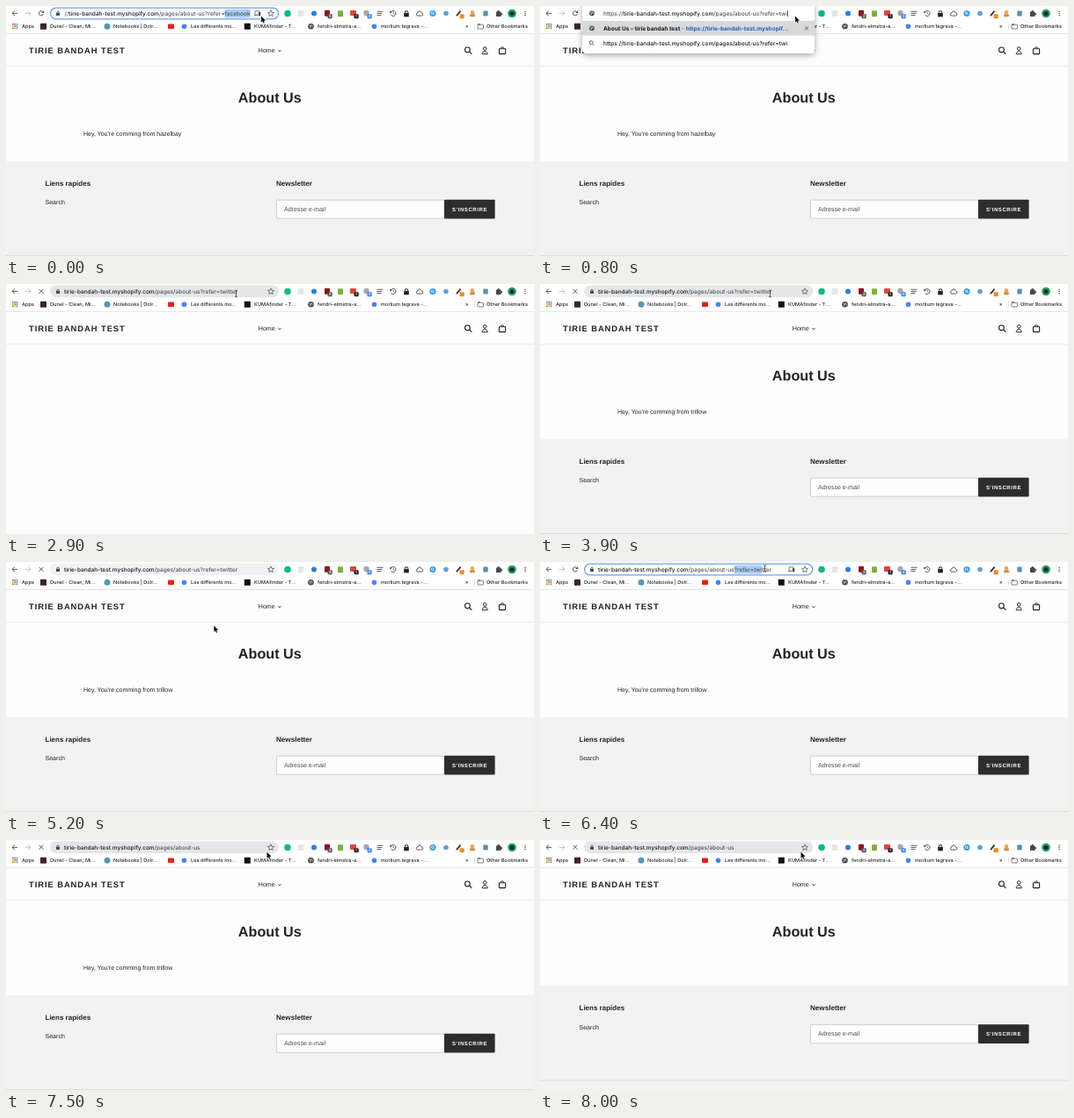
An HTML page with a canvas for the animation above (8200 ms loop, 600 by 285 pixels).

```html
<!DOCTYPE html>
<html lang="fr">
<head>
<meta charset="utf-8">
<title>About Us</title>
<style>
html, body { margin: 0; width: 100%; height: 100%; overflow: hidden; background: #fff; }
canvas { display: block; width: 600px; height: 285px; }
</style>
</head>
<body>
<canvas id="stage"></canvas>
<script>
const W = 600, H = 285, LOOP = 8200, STEP = 100;
const canvas = document.getElementById('stage');
const c = canvas.getContext('2d');
const dpr = window.devicePixelRatio || 1;
canvas.width = W * dpr;
canvas.height = H * dpr;
c.textRendering = 'geometricPrecision';

const UI = 'Inter, Roboto, sans-serif';
const PAGE = '"Liberation Sans", Arial, sans-serif';
const DARK = '#17181a', GREY = '#505357', ICON = '#45484c', INK = '#222', HEAD = '#222';
const HOST = 'tirie-bandah-test.myshopify.com';
const PATH = '/pages/about-us';
const URL_SIZE = 6.5, URL_WEIGHT = 500;

function text(str, x, y, size, color, family = UI, weight = 400, spacing = 0) {
  c.font = `${weight} ${size}px ${family}`;
  c.letterSpacing = spacing + 'px';
  c.fillStyle = color;
  c.fillText(str, x, y);
  const w = c.measureText(str).width;
  c.letterSpacing = '0px';
  return x + w;
}

function rect(x, y, w, h, color) {
  c.fillStyle = color;
  c.fillRect(x, y, w, h);
}

function pill(x, y, w, h, r, fill, stroke, lw = 1) {
  c.beginPath();
  c.roundRect(x, y, w, h, r);
  if (fill) { c.fillStyle = fill; c.fill(); }
  if (stroke) { c.strokeStyle = stroke; c.lineWidth = lw; c.stroke(); }
}

function dot(x, y, r, color) {
  c.beginPath();
  c.arc(x, y, r, 0, 7);
  c.fillStyle = color;
  c.fill();
}

function ring(x, y, r, color, lw = 0.9, from = 0, to = Math.PI * 2) {
  c.beginPath();
  c.arc(x, y, r, from, to);
  c.strokeStyle = color;
  c.lineWidth = lw;
  c.stroke();
}

function line(points, color, lw = 1) {
  c.beginPath();
  points.forEach(([x, y]) => c.lineTo(x, y));
  c.strokeStyle = color;
  c.lineWidth = lw;
  c.stroke();
}

function poly(points, fill) {
  c.beginPath();
  points.forEach(([x, y]) => c.lineTo(x, y));
  c.closePath();
  c.fillStyle = fill;
  c.fill();
}

function magnifier(x, y, r, color, lw) {
  ring(x - r * 0.3, y - r * 0.3, r, color, lw);
  line([[x + r * 0.45, y + r * 0.45], [x + r * 1.4, y + r * 1.4]], color, lw);
}

function globe(x, y, r = 2.9) {
  dot(x, y, r, ICON);
  line([[x - 1.9, y - 1], [x - 0.2, y - 0.2], [x - 0.7, y + 1.7]], '#fff', 0.8);
  line([[x + 0.4, y - 1.9], [x + 0.9, y - 0.5], [x + 2, y + 0.4]], '#fff', 0.8);
}

function padlock(x, y, color, s = 1) {
  rect(x - 2 * s, y - 0.6 * s, 4 * s, 3.2 * s, color);
  ring(x, y - 0.8 * s, 1.3 * s, color, 0.8 * s, Math.PI, 0);
}

function star(x, y, r) {
  const pts = [];
  for (let i = 0; i <= 10; i++) {
    const a = -Math.PI / 2 + i * Math.PI / 5, q = i % 2 ? r * 0.45 : r;
    pts.push([x + q * Math.cos(a), y + q * Math.sin(a)]);
  }
  line(pts, ICON, 0.7);
}

function cloud(x, y) {
  c.beginPath();
  c.arc(x - 2, y + 1, 1.6, Math.PI / 2, Math.PI * 1.5);
  c.arc(x, y - 0.6, 2, Math.PI, Math.PI * 1.9);
  c.arc(x + 2.2, y + 1, 1.6, -Math.PI / 2, Math.PI / 2);
  c.closePath();
  c.strokeStyle = ICON;
  c.lineWidth = 0.9;
  c.stroke();
}

function arrow(x, y, dir, color) {
  line([[x - 3 * dir, y], [x + 3 * dir, y]], color, 0.9);
  line([[x, y - 2.9], [x + 3 * dir, y], [x, y + 2.9]], color, 0.9);
}

function reloadIcon(loading) {
  const x = 40, y = 8.3;
  if (loading) {
    line([[x - 2.5, y - 2.5], [x + 2.5, y + 2.5]], ICON, 0.9);
    line([[x - 2.5, y + 2.5], [x + 2.5, y - 2.5]], ICON, 0.9);
  } else {
    ring(x, y, 2.6, ICON, 0.9, 0.3, 5.4);
    poly([[x + 3.1, y - 3.2], [x + 3.1, y - 0.3], [x + 0.3, y - 0.3]], ICON);
  }
}

function badge(x, label, color) {
  pill(x + 0.5, 9.3, 5.2, 5, 1, color);
  text(label, x + 2, 13.3, 4, '#fff', UI, 600);
}

function extensions() {
  const y = 8.5;
  dot(320, y, 3.8, '#12b886');
  pill(331.6, y - 3.4, 6.8, 6.8, 1, '#e4e6e8');
  dot(350, y, 3, '#2f7de1');
  pill(362, y - 3.7, 6, 7, 1, '#8c1620');
  badge(365, '2', '#555');
  pill(377, y - 3.3, 6, 7, 1, '#7fae42');
  pill(391, y - 3.5, 7, 6, 1, '#e0443e');
  badge(395, '1', '#222');
  dot(409.5, y - 0.5, 3.2, '#a5a9ad');
  badge(410, '6', '#3b82e8');
  for (let i = 0; i < 3; i++) rect(421.5, y - 2.7 + i * 2.2, 7 - i, 0.9, ICON);
  ring(440, y, 3, ICON, 0.9, -2.6, 2.6);
  line([[440, y - 1.6], [440, y], [441.4, y + 0.8]], ICON, 0.8);
  poly([[435.8, y - 2.2], [438.8, y - 2.4], [437, y + 0.2]], ICON);
  padlock(455, y + 0.2, '#222', 1.4);
  cloud(470, y);
  dot(485, y, 3.6, '#3c9be8');
  magnifier(485, y, 1.3, '#fff', 0.7);
  dot(500, y, 2.8, '#5f9fd8');
  line([[512, y + 2.6], [516.5, y - 2.8]], '#333', 1.8);
  badge(515, '·', '#f08a24');
  dot(530, y - 1.3, 2.3, '#e9a45b');
  pill(527, y + 0.8, 6, 2.9, 1.2, '#d58a3c');
  pill(542.3, y - 3, 5.4, 6, 1, '#5a8fb4');
  rect(557, y - 2, 5.5, 5.5, ICON);
  dot(559.7, y - 2.3, 1.3, ICON);
  dot(562.7, y + 0.7, 1.3, ICON);
  dot(575, y, 4.8, '#20a060');
  dot(575, y, 2.6, '#1d2b26');
  for (let i = -1; i < 2; i++) dot(590, y + i * 2.3, 0.75, ICON);
}

function bookmarks() {
  const y = 23.2, base = 25.2, size = 5.65;
  const tints = ['#e2574c', '#4a86e8', '#3fa35b', '#eeb62f'];
  for (let i = 0; i < 9; i++) {
    rect(7 + (i % 3) * 2.3, y - 3.3 + Math.floor(i / 3) * 2.3, 1.7, 1.7, tints[i % 4]);
  }
  pill(39, y - 3.5, 7, 7, 0.5, '#3a2725');
  dot(115, y, 3.5, '#5599ab');
  pill(184, y - 2.7, 7, 5.4, 1, '#e62117');
  dot(202.5, y, 2.8, '#4285f4');
  pill(270.8, y - 3.5, 7, 7, 0.5, '#111');
  globe(346.5, y, 3.3);
  dot(418.5, y, 2.8, '#4285f4');
  [[18, 'Apps'], [50, 'Dunel - Clean, Mi...'], [122, 'Notebooks | Dolr...'],
   [210, 'Les différents mo...'], [282, 'KUMAfinder - T...'],
   [354, 'fendri-elmstra-a...'], [426, 'morlium tegrava -...'],
   [522, '»'], [546, 'Other Bookmarks']].forEach(([x, s]) => text(s, x, base, size, '#26282b', UI, 450));
  rect(532, y - 3.5, 0.6, 7, '#d0d3d6');
  pill(536, y - 2, 6.4, 4.8, 0.6, null, ICON, 0.7);
  rect(536, y - 2.8, 2.8, 1, ICON);
}

function address(x, y, scheme, tail) {
  const a = text(scheme, x, y, URL_SIZE, GREY, UI, URL_WEIGHT);
  const b = text(HOST, a, y, URL_SIZE, DARK, UI, URL_WEIGHT);
  return text(PATH + tail, b, y, URL_SIZE, GREY, UI, URL_WEIGHT);
}

function urlWidth(str) {
  c.font = `${URL_WEIGHT} ${URL_SIZE}px ${UI}`;
  return c.measureText(str).width;
}

function suggestions(rows, tail) {
  c.save();
  c.shadowColor = 'rgba(0,0,0,.35)';
  c.shadowBlur = 7 * dpr;
  c.shadowOffsetY = 2 * dpr;
  pill(48, -4, 264, 24 + 17 * rows, 4, '#fff');
  c.restore();
  rect(48, 17, 264, 16.6, '#d8d9db');
  for (let i = 0; i < rows; i++) {
    const y = 25.3 + 17 * i, base = y + 2.2;
    if (i === 1) {
      magnifier(58.8, y, 2, ICON, 0.8);
      text('https://' + HOST + PATH + tail, 72, base, URL_SIZE, DARK, UI, URL_WEIGHT);
      continue;
    }
    globe(59, y);
    const weight = i ? URL_WEIGHT : 700;
    const end = text('About Us – tirie bandah test', 72, base, URL_SIZE, DARK, UI, weight);
    const dash = text(' - ', end, base, URL_SIZE, GREY, UI, URL_WEIGHT);
    text('https://' + HOST.slice(0, 24) + 'if...', dash, base, URL_SIZE, '#1f5fc0', UI, weight);
  }
  line([[301, 23.3], [305, 27.3]], ICON, 0.8);
  line([[301, 27.3], [305, 23.3]], ICON, 0.8);
}

function omnibox(s, hover) {
  const base = 10.6;
  if (s.edit) {
    if (s.rows) suggestions(s.rows, s.tail);
    globe(59, 8.3);
    const end = address(72, base, 'https://', s.tail);
    rect(end + 0.2, 4.8, 0.6, 7.6, '#222');
    return;
  }
  if (s.focus) pill(50.6, 2.1, 259, 12.8, 6.4, '#fff', '#6f9fe8', 1.3);
  else pill(50, 1.6, 260, 13.6, 6.8, hover ? '#e4e6e8' : '#f0f2f3');
  padlock(59, 8.3, ICON);
  const x = s.scheme ? 66.5 : 66;
  if (s.sel) {
    const lead = s.scheme + HOST + PATH + s.tail;
    const from = x + urlWidth(lead.slice(0, lead.length - s.tail.length + s.sel[0]));
    const full = urlWidth(s.tail.slice(s.sel[0]));
    rect(from, 3.8, full * s.sel[1], 9.6, '#a9cdf6');
  }
  address(x, base, s.scheme, s.tail);
  if (s.focus) {
    pill(283, 5.8, 5.2, 4.2, 0.5, null, ICON, 0.7);
    rect(281.8, 10.4, 4, 0.7, ICON);
    rect(287, 7, 2.2, 4.2, ICON);
  }
  star(301, 8.6, 3.7);
}

function header() {
  rect(0, 31, W, 0.8, '#e2e3e4');
  text('TIRIE BANDAH TEST', 26, 53.7, 9.4, HEAD, PAGE, 700, 0.94);
  text('Home', 286.8, 52.7, 7.1, INK, PAGE);
  line([[309.4, 50.4], [311, 52], [312.6, 50.4]], INK, 0.8);
  magnifier(525.3, 50.8, 2.9, INK, 1.1);
  ring(544.2, 48.5, 1.8, INK, 1);
  c.beginPath();
  c.moveTo(541.2, 54.8);
  c.bezierCurveTo(541.2, 50.6, 547.2, 50.6, 547.2, 54.8);
  c.closePath();
  c.stroke();
  pill(560.4, 48.8, 7.2, 5.8, 0.6, null, INK, 1.1);
  ring(564, 48.6, 1.8, INK, 0.9, Math.PI, 0);
  rect(0, 68.4, W, 0.8, '#e6e6e6');
}

function page(from) {
  text('About Us', 263.8, 110.3, 16.2, HEAD, PAGE, 700);
  if (from) text("Hey, You're comming from " + from, 88, 147.7, 7, INK, PAGE);
  c.save();
  if (!from) c.translate(0, -10.6);
  rect(0, 176.7, W, 120, '#f2f2f2');
  rect(0, 284.2, W, 0.8, '#d9d9d9');
  text('Liens rapides', 44.5, 204.7, 8, HEAD, PAGE, 700);
  text('Newsletter', 307, 204.7, 8.1, HEAD, PAGE, 700);
  text('Search', 44.5, 226.1, 7.05, INK, PAGE);
  pill(307.4, 221.2, 191, 21, 0.6, '#fdfdfd', '#c6c6c6', 0.8);
  text('Adresse e-mail', 316, 234, 7.05, '#4c4c4c', PAGE);
  pill(498, 220.8, 57.6, 21.8, 0.8, '#2d2d2d');
  text("S'INSCRIRE", 507, 233.8, 6, '#fff', PAGE, 700, 0.6);
  c.restore();
}

// Pointer path: time, x, y; moves ease between neighbouring stops.
const STOPS = [[0, 290, 11.5], [2500, 290, 11.5], [2800, 261.5, 11], [4500, 261.5, 11],
  [4900, 145, 161.5], [5000, 145, 161.5], [5200, 236.3, 72.5], [5300, 236.3, 72.5],
  [5900, 220, 8], [6200, 220, 8], [6400, 255.5, 7.5], [6500, 264, 8], [6900, 296.5, 13.6], [LOOP, 296.5, 13.6]];

function pointerAt(t) {
  const i = STOPS.findIndex(s => s[0] > t);
  const [t0, x0, y0] = STOPS[i - 1], [t1, x1, y1] = STOPS[i];
  const p = (t - t0) / (t1 - t0), e = p * p * (3 - 2 * p);
  return [x0 + (x1 - x0) * e, y0 + (y1 - y0) * e];
}

function pointer([x, y]) {
  if (y < 15 && x > 60 && x < 282) {
    line([[x, y - 3.4], [x, y + 3.4]], '#222', 0.8);
    line([[x - 1.5, y - 4], [x, y - 3.3], [x + 1.5, y - 4]], '#222', 0.7);
    line([[x - 1.5, y + 4], [x, y + 3.3], [x + 1.5, y + 4]], '#222', 0.7);
    return;
  }
  const pts = [[0, 0], [0, 7.2], [1.6, 5.8], [2.7, 8.2], [3.8, 7.7], [2.8, 5.3], [5, 5.2]]
    .map(([a, b]) => [x + a, y + b]);
  line([...pts, pts[0]], '#fff', 1.2);
  poly(pts, '#111');
}

const KEYS = [100, 300, 600, 900, 1100, 1400, 1600];

function barState(t) {
  const s = { scheme: '', tail: '?refer=twitter', rows: 0 };
  if (t < 100) {
    return { ...s, scheme: '//', tail: '?refer=facebook', focus: true, sel: [7, 1] };
  }
  if (t < 2400) {
    const typed = 'twitter'.slice(0, KEYS.filter(k => k <= t).length);
    const rows = t < 400 || (t >= 1600 && t < 1800) ? 3 : 2;
    return { ...s, tail: '?refer=' + typed, edit: true, rows };
  }
  if (t < 6100) return s;
  if (t < 7200) {
    const share = Math.min(1, Math.max(0, (pointerAt(t)[0] - 220) / 43));
    return { ...s, focus: true, sel: [0, t >= 6500 ? 1 : share * 0.9] };
  }
  if (t < 7500) return { ...s, tail: '', edit: true, rows: t < 7300 ? 0 : 4 };
  return { ...s, tail: '' };
}

function draw(t) {
  const tip = pointerAt(t);
  c.setTransform(dpr, 0, 0, dpr, 0, 0);
  rect(0, 0, W, H, '#fdfdfd');
  rect(0, 0, W, 31, '#fff');
  header();
  if (t < 2800) page('hazelbay');
  else if (t >= 3200) page(t < 7900 ? 'trillow' : '');
  arrow(10, 8.4, -1, ICON);
  arrow(25, 8.4, 1, '#b9bcc0');
  reloadIcon((t >= 2600 && t < 5600) || t >= 7500);
  extensions();
  bookmarks();
  omnibox(barState(t), tip[1] < 15);
  pointer(tip);
}

const start = performance.now();
function tick() {
  const t = (performance.now() - start) % LOOP;
  draw(Math.floor(t / STEP) * STEP);
  requestAnimationFrame(tick);
}
tick();
</script>
</body>
</html>
```
